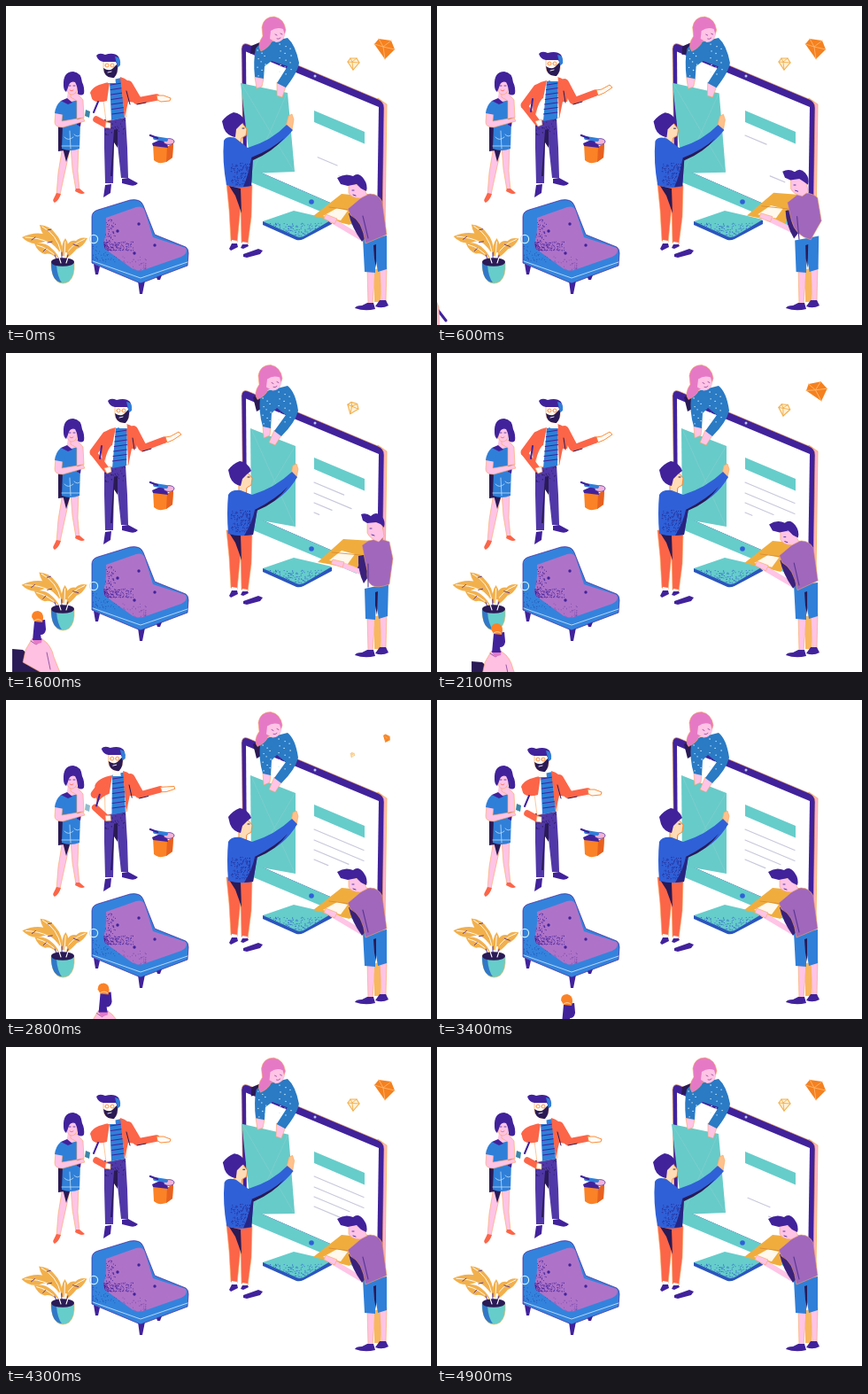
An HTML page that plays this animation: 480 by 360 pixels, repeating every 5 s.

```html
<!DOCTYPE html>
<html lang="en">
<head>
<meta charset="utf-8">
<title>Building a page together</title>
<style>
html, body { margin: 0; width: 100%; height: 100%; overflow: hidden; background: #fff; }
svg { display: block; width: 100vw; height: 100vh; }
</style>
</head>
<body>
<svg id="stage" viewBox="0 0 480 360"></svg>
<script>
const LOOP = 5000;
const NAVY = '#41229b', DARK = '#2a1a55', BLUE = '#2f7fd8', ROYAL = '#2f60d8', TEAL = '#66cdcb',
  PURPLE = '#ae73c8', RED = '#fc6548', ORANGE = '#fb8226', GOLD = '#f2b04c', PINK = '#ffc4e6', WHITE = '#fff';
const stage = document.getElementById('stage');
const moving = [];

function add(tag, attrs, parent = stage) {
  const el = document.createElementNS('http://www.w3.org/2000/svg', tag);
  for (const name in attrs) el.setAttribute(name, attrs[name]);
  parent.appendChild(el);
  return el;
}
const group = (parent = stage) => add('g', {}, parent);
const fill = (color, d, parent, more) => add('path', { d, fill: color, ...more }, parent);
const line = (color, width, d, parent, more) => add('path', {
  d, fill: 'none', stroke: color, 'stroke-width': width, 'stroke-linecap': 'round', 'stroke-linejoin': 'round', ...more
}, parent);
const dot = (color, cx, cy, r, parent) => add('circle', { cx, cy, r, fill: color }, parent);

// Two poses of one path, blended by a named channel.
function morph(el, channel, a, b) {
  const from = a.match(/-?[\d.]+/g).map(Number), to = b.match(/-?[\d.]+/g).map(Number);
  moving.push({ el, channel, a, from, to });
  return el;
}
const fillPose = (channel, color, a, b, more) => morph(fill(color, a, stage, more), channel, a, b);
const linePose = (channel, color, width, a, b, more) => morph(line(color, width, a, stage, more), channel, a, b);

let seed = 7;
const random = () => (seed = seed * 16807 % 2147483647) / 2147483647;
let clips = 0;
// Speckled shade inside a shape, dense at (x, y), fading over (w, h).
function grain(color, shape, x, y, w, h, count, parent = stage) {
  const id = 'clip' + clips++;
  fill('#000', shape, add('clipPath', { id }, parent));
  let d = '';
  for (let i = 0; i < count; i++) {
    const px = x + w * random() ** 2, py = y + h * random() ** 1.4;
    d += `M${px.toFixed(1)} ${py.toFixed(1)}h.1`;
  }
  return line(color, .9, d, parent, { 'clip-path': `url(#${id})` });
}

const EDGE = { stroke: '#f7a45c', 'stroke-width': .6 };

// Sofa
const sofa = 'M97 238Q97 232 104 230L140 219Q152 217 155 225L168 258L203 272Q206 274 206 279L205 293L152 313L97 290Z';
const cushion = 'M113 239L147 227Q155 225 157 232L166 261L203 273Q206 279 198 283L155 298Q148 300 142 296L113 275Q109 272 111 265Q114 252 113 239Z';
fill(NAVY, 'M99 291L106 294L104 303L101 303ZM149 310L157 310L154 325L151 325ZM169 303L177 301L174 309L171 309Z');
fill('#3383dd', sofa, stage, { stroke: NAVY, 'stroke-width': .7 });
grain('#2455b5', sofa, 98, 289, 30, -20, 60);
fill(PURPLE, cushion);
grain(NAVY, cushion, 110, 276, 34, -10, 130);
grain(NAVY, cushion, 111, 276, 14, -36, 110);
grain('#7d4fae', cushion, 158, 299, -30, -16, 60);
line('#d5ecfb', .8, 'M98 288L152 307L205 289');
for (const [x, y] of [[126, 254], [150, 246], [145, 279], [168, 270]]) dot(NAVY, x, y, 1.7);
add('circle', { cx: 99, cy: 263, r: 4.6, fill: 'none', stroke: '#c9eef2', 'stroke-width': 1.2 });

// Plant
const leaves = group();
function leaf(d, rib) {
  fill(GOLD, d, leaves);
  line(WHITE, .9, rib, leaves);
}
leaf('M62 282Q52 262 40 267Q28 271 18 261Q30 255 42 257Q59 260 65 282Z', 'M62 281Q53 262 22 261');
leaf('M62 279Q58 264 50 266Q40 259 38 247Q50 248 56 257Q63 264 64 278Z', 'M62 278Q58 258 41 249');
leaf('M65 282Q68 263 79 265Q84 260 92 262Q87 272 80 274Q74 281 69 284Z', 'M67 282Q73 269 89 263');
leaf('M58 285Q50 278 44 280Q36 278 32 268Q44 266 52 274Q57 278 60 285Z', 'M58 284Q48 273 35 270');
leaf('M64 282Q61 270 67 262Q73 270 69 283Z', 'M66 282L67 266');
line(NAVY, .8, 'M33 261L29 264M47 253L51 252M76 269L82 271M45 274L42 277M52 266L47 267', leaves);
line(WHITE, 2, 'M62 289L61 278M66 289L68 279M59 289L57 284', leaves);
line(NAVY, .9, 'M63 288L63 278M58 288L55 281M68 288L70 281', leaves);
fill(TEAL, 'M51 290L77 290Q78 305 71 311Q64 315 58 311Q51 305 51 290Z', stage, { stroke: GOLD, 'stroke-width': .6 });
fill('#3178c8', 'M51 290L57 292Q58 306 63 312Q51 311 51 290Z');
add('ellipse', { cx: 64, cy: 289, rx: 13, ry: 4.8, fill: DARK });
line(WHITE, 1.1, 'M62 290L60 284M68 290L70 284');

// Woman on the left
fill(PINK, 'M64 158L73 158L66 190L61 213L57 213L59 188ZM73 158L82 158L81 186L83 208L79 208L75 184Z', stage, EDGE);
fill(DARK, 'M59 136L66 136L66 163L59 164ZM64 160L73 160L68 176Z');
fill(RED, 'M57 211L62 212Q60 219 55 222Q52 220 54 217ZM79 206L83 206L89 211Q86 213 82 211L78 209Z');
fill(PINK, 'M70 96L80 96L81 112L68 110Z');
fill(BLUE, 'M61 108Q68 105 74 108L81 106Q86 112 84 130L83 161Q73 165 63 161L64 134Q58 120 61 108Z');
fill(NAVY, 'M81 124L86 122L84 136L80 134Z');
fill(PINK, 'M56 118L64 120L63 130L87 126L89 130L64 137Q55 137 55 131ZM80 128L88 126L87 106L80 98L73 98L73 103L80 107Z', stage, EDGE);
fill(BLUE, 'M62 107Q56 112 55 121L66 123L68 108Z');
fill(NAVY, 'M62 107L69 104L75 109L70 111Z');
line('#bfe0f7', .8, 'M66 148Q70 153 76 148M77 145Q81 149 84 145M72 141L73 161M63 158L83 158');
fill(PINK, 'M68 84L80 84L81 93Q79 100 74 100Q69 99 69 93Z', stage, EDGE);
fill(NAVY, 'M65 90Q64 74 76 74Q85 75 86 86Q89 92 88 99Q85 102 81 99Q81 91 78 86Q72 84 70 92L68 97Q65 95 65 90Z');
line(RED, .8, 'M72 95Q74 97 76 95');
line(NAVY, .8, 'M71 90L73 90M76 90L78 90');
const phone = fill('#3c86a8', 'M90 117L95 119L94 126L89 124Z');

// Man with the open jacket
fill(WHITE, 'M112 196L119 196L118 206L112 206ZM131 190L137 190L139 198L132 198Z');
fill('#5138a8', 'M111 128L135 126L137 160L138 194L130 194L126 156L122 150L121 200L112 200L111 160Z');
fill(DARK, 'M122 140L126 139L126 160L122 154L120 192L118 192Z');
grain(DARK, 'M111 128L135 126L137 160L124 156L112 165Z', 112, 128, 24, 18, 60);
fill(NAVY, 'M112 202L119 201L118 211L110 216ZM131 195L138 194L149 200Q146 204 139 202L131 200Z');
fillPose('man', WHITE, 'M108 90L134 83L136 125L113 130Z', 'M115 89L143 83L138 126L111 130Z', EDGE);
fillPose('man', BLUE, 'M117 84L130 81L134 126L119 129Z', 'M124 85L137 82L136 127L120 130Z');
for (let i = 0; i < 7; i++) {
  const y = 89 + i * 5.5;
  linePose('man', NAVY, 1.1, `M${118 + i * .3} ${y}L${131 + i * .5} ${y - 2}`, `M${124 - i * .6} ${y}L${137 - i * .2} ${y - 2}`);
}
fillPose('man', RED, 'M95 98Q98 89 117 86L114 107Q103 110 98 106Z', 'M107 95Q110 87 124 84L120 104Q115 106 109 130L104 112Z');
fillPose('man', RED, 'M129 80Q139 82 144 94L147 109L138 108L134 126Z', 'M136 80Q145 82 150 92L147 108L142 108L138 127Z');
linePose('man', RED, 9, 'M107 94L101 102', 'M113 93L99 112');
linePose('man', RED, 7.5, 'M102 128L113 134', 'M99 113L113 131');
linePose('man', NAVY, 2, 'M104 108L99 120', 'M108 105L106 119');
linePose('man', RED, 10, 'M138 89L148 106', 'M144 87L154 106');
linePose('man', RED, 7.5, 'M149 107L170 103', 'M155 107L179 98');
linePose('man', DARK, 1, 'M136 96L140 111M148 111L158 109', 'M143 96L145 109M154 111L164 108');
fillPose('man', '#fffaf4', 'M170 101L178 101L186 104L185 107L175 108L171 106Z', 'M180 95L186 94L195 89L198 92L189 98L182 101Z',
  { stroke: ORANGE, 'stroke-width': .9 });
fillPose('man', '#fffaf4', 'M113 131L118 132L118 138L112 137Z', 'M111 130L118 128L119 134L114 136Z', EDGE);
const manHead = group();
fill('#fffaf4', 'M114 76L123 78L124 87L115 87Z', manHead);
fill('#fffaf4', 'M110 62L126 61L126 73Q124 81 117 80Q110 78 110 70Z', manHead, EDGE);
fill(DARK, 'M110 70Q116 74 120 71L126 65Q127 76 122 81Q111 82 110 70Z', manHead);
fill(NAVY, 'M102 56Q105 52 112 55Q122 52 127 57Q130 62 127 69L124 63L110 63Q104 62 102 56Z', manHead);
fill(BLUE, 'M123 57Q130 57 129 67L126 69Z', manHead);
line(ORANGE, .8, 'M112 67a2 2 0 1 0 4 0a2 2 0 1 0 -4 0M118 67a2 2 0 1 0 4 0a2 2 0 1 0 -4 0', manHead);
line(WHITE, .9, 'M115 75L119 74', manHead);

// Paint bucket
fill(ORANGE, 'M166 155L182 159L189 155L188 171L181 176Q172 179 167 174Z');
fill('#e8611f', 'M182 159L189 155L188 171L181 176Z');
fill(NAVY, 'M165 155L174 151L182 154L183 160L166 158Z');
add('ellipse', { cx: 184, cy: 153, rx: 6, ry: 3.4, fill: '#f3b3d8', stroke: NAVY, 'stroke-width': .7 });
line(BLUE, 4, 'M168 149L181 151');
line(NAVY, 2.4, 'M163 146L171 149');

// Monitor
fill('#2c55bd', 'M290 243L290 247L328 264Q332 265 336 263L368 246L368 242Z');
const base = 'M290 243L325 231L368 241L336 260Q332 262 328 260Z';
fill(TEAL, base);
grain('#2f60c8', base, 294, 262, 62, -17, 300);
fill('#ffb5cf', 'M420 104L430 111L428 248L421 248Z', stage, { stroke: GOLD, 'stroke-width': .8 });
fill(NAVY, 'M266 48Q267 41 273 43L420 105Q427 108 427 115L425 247L396 247L268 192Z', stage, EDGE);
fill(WHITE, 'M271 51.5L421 114L419 245L272 181Z');
fill(TEAL, 'M272 181L396 235L396 249L272 197Z');
dot(ROYAL, 345, 221, 2.8);
dot('#b9c4f2', 349, 79, 1.5);
fill(TEAL, 'M348 118L405 142L405 155.5L348 131Z');
const copy = [[146, 56], [158, 56], [169, 40], [180, 56]].map(([y, size]) => ({ y, size, el: line('#c9c8dc', 1.2, 'M0 0') }));

// Poster
const paperA = 'M265 87L318 98L326 187L277 189Z', paperB = 'M276 85L327 105L327 196L277 187Z';
fillPose('hang', '#67cbc9', paperA, paperB);
linePose('hang', '#83cfcc', .7, 'M266 88L325 186M317 99L278 188', 'M277 86L326 195M326 106L278 186');

// Woman above the monitor
fillPose('hang', DARK, 'M277 45L289 40L288 52L276 54Z', 'M279 50L289 44L290 62L283 66Z');
const knitA = 'M282 48Q288 40 300 40L318 36Q327 44 331 64Q330 74 316 92L306 87L318 68L300 62L292 68L291 82L281 80Q279 62 282 48Z';
const knitB = 'M287 50Q292 42 302 41L318 37Q327 44 330 65Q327 78 311 94L303 88L316 70L306 62L300 68L299 85L290 83Q285 66 287 50Z';
fillPose('hang', PINK, 'M281 80L291 82L289 91L283 93Z', 'M290 82L299 84L298 93L291 96Z', EDGE);
fillPose('hang', PINK, 'M306 86L316 91L312 103L306 101Z', 'M303 87L311 93L304 104L297 101Z', EDGE);
fillPose('hang', '#2a7ac4', knitA, knitB);
for (let i = 0; i < 24; i++) {
  const right = i > 9, row = right ? i - 10 : i;
  const x = (right ? 309 : 284) + row % 3 * (right ? 6 : 4) + row % 2, y = (right ? 43 : 50) + row * (right ? 2.6 : 3.2);
  linePose('hang', '#cdeef6', 1.3, `M${x} ${y}L${x + .2} ${y}`, `M${x + (right ? -1 : 6)} ${y + 1}L${x + (right ? -.8 : 6.2)} ${y + 1}`);
}
const girlHead = group();
fill('#e679c6', 'M289 24Q291 12 303 12Q314 14 316 27L313 37L300 40Q297 47 288 51Q283 44 290 34Z', girlHead, EDGE);
fill(PINK, 'M299 28Q306 23 313 26L315 33Q312 41 305 41L298 37Z', girlHead);
line('#9d4fa2', .9, 'M304 32L306 33M310 31L312 32M306 37Q308 38 310 36', girlHead);

// Man hanging the poster
fill(RED, 'M249 200L278 202L277 238L273 269L266 267L265 226L261 267L254 265L252 230Z', stage, EDGE);
fill(DARK, 'M252 203L265 206L266 234L263 225L259 214Z');
fill(WHITE, 'M255 264L261 265L261 269L255 268ZM267 266L273 267L272 270L267 269Z');
fill(NAVY, 'M255 268L261 268L262 272L254 276L252 274ZM267 269L273 269L274 271L268 274L265 273ZM268 280L285 274L290 276L287 280L272 284L268 283Z');
fillPose('hang', '#ffc18c', 'M316 136L319 124L323 122L325 128L323 140Z', 'M322 136L324 127L328 125L330 131L328 141Z', EDGE);
fillPose('hang', '#ffdcb6', 'M257 139L266 131L272 139L271 146L266 149L265 157L257 155Z', 'M263 142L272 134L278 141L277 149L272 152L271 160L263 158Z',
  { stroke: ORANGE, 'stroke-width': .9 });
const shirtA = 'M246 152Q249 146 259 149L273 160Q300 152 317 134L324 140Q306 162 279 171L277 203Q264 207 249 202Q244 175 246 152Z';
const shirtB = 'M251 160Q254 154 265 155L278 160Q304 152 323 134L329 140Q314 166 284 176L279 205Q264 208 251 204Q249 180 251 160Z';
fillPose('hang', ROYAL, shirtA, shirtB);
fillPose('hang', '#28247f', 'M277 172L279 171L277 203L268 204Q274 190 277 172Z', 'M281 177L284 176L279 205L269 206Q278 192 281 177Z');
fillPose('hang', DARK, 'M277 171Q300 162 314 149Q302 164 279 174Z', 'M281 177Q306 164 318 151Q306 169 283 178Z');
grain('#242a8f', 'M250 176L276 176L276 203L250 202Z', 276, 203, -22, -26, 170);
fillPose('hang', NAVY, 'M244 130Q249 123 257 120Q266 121 270 130L265 134L260 139L259 148Q249 146 246 138Z',
  'M251 132Q256 125 264 122Q273 123 277 133L272 137L267 142L265 150Q256 148 253 140Z');
linePose('hang', DARK, 1, 'M267 138L269 138', 'M273 140L275 140');

// Man with the envelope
fill(PINK, 'M408 296L417 298L414 337L409 337Z', stage, EDGE);
fill('#f8b860', 'M416 297L423 296L423 334L416 334Z');
fill(PINK, 'M422 296L430 294L429 334L424 334Z', stage, EDGE);
fill(NAVY, 'M408 335L415 335L417 342Q405 345 394 341Q395 338 402 338ZM422 332L429 332L432 338Q425 342 417 339Z');
fillPose('lean', BLUE, 'M403 262L430 259L430 297L420 300L417 282L417 301L405 300Z', 'M405 266L432 260L431 297L421 300L418 282L417 301L406 300Z');
fillPose('lean', DARK, 'M415 270L418 269L418 296L416 285Z', 'M417 270L420 269L419 296L417 285Z');
fillPose('lean', '#f0ad3e', 'M347 237L379 212L411 215L388 247Z', 'M352 236L381 210L414 212L396 244Z');
fillPose('lean', '#fff8ec', 'M358 237L374 228L386 231L378 242Z', 'M365 234L379 223L394 227L386 238Z');
linePose('lean', '#d98a2b', .8, 'M365 227L396 231', 'M368 225L400 228');
linePose('lean', PINK, 6, 'M400 261L368 242', 'M403 248L377 238');
fillPose('lean', PINK, 'M371 246L359 240L361 235L374 240Z', 'M380 242L367 238L369 233L382 236Z', EDGE);
fillPose('lean', '#3a217c', 'M387 234L402 231L409 258L402 266Q390 249 387 234Z', 'M398 229L409 227L411 250L404 260Q397 246 398 229Z');
fillPose('lean', '#a067bc', 'M386 229L405 213Q419 209 425 221L430 258L406 268Q403 242 389 236Z', 'M402 217L409 212Q422 208 433 213Q437 232 433 261L406 271Q408 246 400 238Z', EDGE);
linePose('lean', '#5a3793', 1.1, 'M403 237L409 262', 'M409 238L409 264');
fillPose('lean', PINK, 'M387 201L398 202L405 208L408 213L400 217Q390 217 387 211Z', 'M408 190L420 191L425 194L427 207L421 213Q411 210 408 203Z', EDGE);
fillPose('lean', NAVY, 'M374 194Q383 188 392 192Q398 187 404 195Q409 202 407 209L401 206L396 201L386 203L378 201Z',
  'M401 182Q407 180 412 184Q418 178 424 184Q429 189 427 197L423 193L418 191L408 192L403 189Z');
linePose('lean', NAVY, .9, 'M391 208L393 208M392 213L395 214', 'M411 198L413 198M413 205L416 206');

// Gems
const bigGem = group(), smallGem = group();
fill('#f5811f', 'M-12 -5L-7 -11L7 -9L11 1L0 12Z', bigGem);
line('#ffb56c', .9, 'M-12 -5L-2 -2L11 1M-7 -11L-2 -2L7 -9M-2 -2L0 12', bigGem);
fill('#fff0d6', 'M-6 -2L-3 -6L4 -6L7 -1L0 7Z', smallGem, { stroke: GOLD, 'stroke-width': 1.1 });
line(GOLD, .9, 'M-6 -2L7 -1M-3 -6L-1 -2L4 -6M-1 -2L0 7', smallGem);

// Passer-by
const walker = group();
line(NAVY, 3, 'M24 74L34 87', walker);
fill(DARK, 'M-29 43L-17 44L-6 54L14 70L14 110L-29 110Z', walker);
fill('#ffc0e2', 'M-7 32L5 32Q15 38 18 52L26 72L27 110L12 110L8 72L-17 58L-14 44Z', walker, EDGE);
line('#8a4b9f', .9, 'M10 47L14 66M3 34L-2 38L-8 34', walker);
fill('#e679c6', 'M-7 31L5 31L4 36L-3 38Z', walker);
fill(NAVY, 'M-4 11L8 10L9 21Q8 27 3 27L4 33L-6 33L-5 22Z', walker);
fill(ORANGE, 'M-7 7Q-7 0 0 0Q6 1 6 8L5 13L-4 12Z', walker);
line('#ffd9a8', 1, 'M-4 11Q0 8 4 11', walker);

// Steps: [time, value, value...], eased or linear between rows.
const steps = {
  man: [[0, 0], [600, 1], [2100, 1], [3400, 0]],
  hang: [[0, 0], [600, .08], [1600, 1], [3400, 1], [4300, .12], [4900, 0]],
  lean: [[0, 0], [600, .6], [1200, 1], [1600, 1], [2100, .04], [2600, 0]],
  big: [[0, 1, 0], [700, 1, 0], [1400, 0, 30], [1700, 0, -50], [2100, 1, -20], [2400, 1, 0], [3100, 0, 30], [3500, 0, -40], [4200, 1, 0]],
  small: [[0, 1, 0], [900, 1, 0], [1600, 1, 18], [2400, 1, 0], [3100, 0, 30], [3500, 0, -40], [4200, 1, 0]],
  walk: [[0, -62, 252], [600, -24, 268], [1600, 36, 291], [2100, 68, 305], [3400, 147, 332], [4300, 203, 363], [4400, 210, 380]],
  start: [[0, .1, .9, .1, .5], [250, 1, 1, 1, .25], [260, 0, 0, 0, .25], [1000, 0, 0, 0, .8], [1300, 0, 0, 0, 0], [4300, 0, 0, 0, 0], [4800, 1, 1, .05, .45], [5000, 1, 1, .1, .5]],
  end: [[0, .1, .9, .65, .9], [250, 1, 1, 1, .8], [260, 0, 0, 0, .8], [600, .43, 0, 0, .8], [1000, .5, .3, 0, .8], [1300, .55, .5, .2, 0],
    [1600, .6, .75, .5, .1], [2100, 1, 1, .8, .14], [2900, 1, 1, 1, .3], [4300, 1, 1, 1, .6], [5000, 1, 1, .65, .9]]
};
function at(name, t, linear) {
  const rows = steps[name];
  let i = rows.length - 1;
  while (rows[i][0] > t) i--;
  const a = rows[i], b = rows[i + 1];
  if (!b) return a.slice(1);
  let k = (t - a[0]) / (b[0] - a[0]);
  if (!linear) k = k * k * (3 - 2 * k);
  return a.slice(1).map((v, n) => v + (b[n + 1] - v) * k);
}
const place = (el, x, y, size = 1, turn = 0) =>
  el.setAttribute('transform', `translate(${x} ${y}) rotate(${turn}) scale(${size})`);

function draw(t) {
  const pose = { man: at('man', t)[0], hang: at('hang', t)[0], lean: at('lean', t)[0] };
  for (const { el, channel, a, from, to } of moving) {
    let i = 0;
    el.setAttribute('d', a.replace(/-?[\d.]+/g, () => {
      const v = from[i] + (to[i] - from[i]) * pose[channel];
      i++;
      return v.toFixed(2);
    }));
  }
  place(manHead, 13 * pose.man, -2 * pose.man);
  place(girlHead, -4 * pose.hang, 1.5 * pose.hang);
  phone.setAttribute('opacity', 1 - pose.man);
  const sway = 1.2 * Math.sin(t / LOOP * Math.PI * 4);
  leaves.setAttribute('transform', `rotate(${sway} 64 288)`);
  const [big, bigTurn] = at('big', t), [small, smallTurn] = at('small', t);
  const bigLift = Math.min(1, Math.abs(bigTurn) / 20), smallLift = Math.min(1, Math.abs(smallTurn) / 18);
  place(bigGem, 428 + 2 * bigLift, 48 - 5 * bigLift, big, bigTurn);
  place(smallGem, 392 - smallLift, 65 - 3 * smallLift, small, smallTurn);
  place(walker, ...at('walk', t, true));
  const s = at('start', t, true), e = at('end', t, true);
  copy.forEach(({ el, y, size }, i) => {
    const from = s[i] * size, to = e[i] * size;
    el.setAttribute('d', `M${348 + from} ${y + from * .42}L${348 + to} ${y + to * .42}`);
    el.setAttribute('visibility', to - from > .3 ? 'visible' : 'hidden');
  });
}

const began = performance.now();
function tick() {
  draw((performance.now() - began) % LOOP);
  requestAnimationFrame(tick);
}
tick();
</script>
</body>
</html>
```
